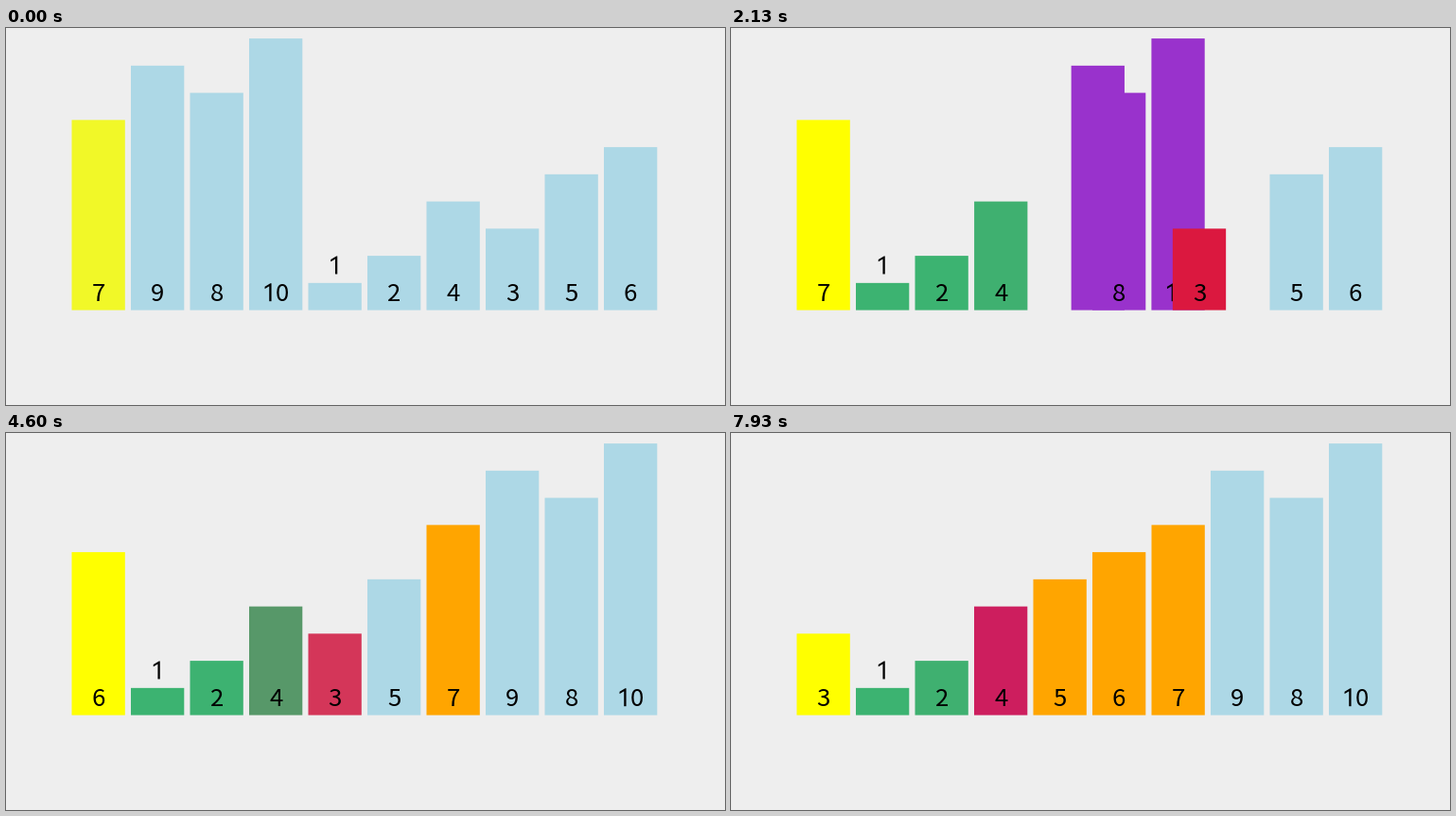
A matplotlib script that plays this animation: 760x399 px, repeating every 8 s.

```python
import numpy as np
import matplotlib.pyplot as plt
from matplotlib.animation import FuncAnimation
from matplotlib.colors import to_rgb
from matplotlib.patches import Polygon, Rectangle

W, H, DPI = 760, 399, 100
LOOP, INTERVAL = 8000, 20
PICTURE = 200 / 3            # the picture is refreshed 15 times a second
STEP, FADE, LEAD = 200, 245, 159   # ms per step, ms per transition, ms already run

LEFT, PITCH, BAR_W = 69.5, 62.5, 56.3
FLOOR, UNIT, BASELINE = 298.6, 28.75, 289.2

BLUE, YELLOW, RED = "lightblue", "yellow", "crimson"
GREEN, PURPLE, ORANGE = "mediumseagreen", "darkorchid", "orange"

VALUES = [7, 9, 8, 10, 1, 2, 4, 3, 5, 6]
order = VALUES[:]
tint = {v: BLUE for v in VALUES}
states = []


def push():
    states.append([(order.index(v), *to_rgb(tint[v])) for v in VALUES])


def swap(a, b):
    order[a], order[b] = order[b], order[a]
    push()


def quicksort(lo, hi):
    pivot = order[lo]
    tint[pivot] = YELLOW
    push()
    store = lo + 1
    for i in range(lo + 1, hi + 1):
        v = order[i]
        tint[v] = RED
        push()
        if v < pivot:
            if i != store:
                swap(i, store)
            tint[v] = GREEN
            store += 1
        else:
            tint[v] = PURPLE
    push()
    swap(lo, store - 1)
    for v in order[lo:hi + 1]:
        tint[v] = BLUE
    tint[pivot] = ORANGE
    push()
    if store - 2 > lo:
        quicksort(lo, store - 2)


def ease(t):
    t = min(max(t, 0), 1)
    return 4 * t**3 if t < 0.5 else 1 - 4 * (1 - t)**3


push()
quicksort(0, len(VALUES) - 1)
states = np.array(states)

# Each step cuts the one before it short and goes on from where it stood.
starts, goals = [states[0]], states[1:]
for goal in goals:
    starts.append(starts[-1] + (goal - starts[-1]) * ease(STEP / FADE))

fig = plt.figure(figsize=(W / DPI, H / DPI), dpi=DPI, facecolor="#eeeeee")
ax = fig.add_axes([0, 0, 1, 1])
ax.set_xlim(0, W)
ax.set_ylim(H, 0)
ax.axis("off")

ONE = np.array([(0.3, 0), (2.6, 0), (2.6, -19), (1.6, -19),
                (-4.4, -15.4), (-4.4, -13.1), (0.3, -15.9)])


class Bar:
    def __init__(self, value, depth):
        height = value * UNIT
        self.base = BASELINE - (UNIT if value == 1 else 0)
        self.rect = Rectangle((0, FLOOR - height), BAR_W, height,
                              lw=0, zorder=depth, snap=False)
        ax.add_patch(self.rect)
        self.parts = []
        digits = str(value)
        for j, digit in enumerate(digits):
            shift = 14.4 * (j - (len(digits) - 1) / 2)
            if digit == "1":
                part = Polygon(ONE, fc="black", lw=0, zorder=depth + 0.5)
                ax.add_patch(part)
            else:
                part = ax.text(0, self.base, digit, ha="center", va="baseline",
                               family="Noto Sans CJK JP", size=25.8 * 72 / DPI,
                               color="black", zorder=depth + 0.5)
            self.parts.append((part, shift))

    def place(self, slot, rgb):
        x = LEFT + PITCH * slot
        self.rect.set_x(x)
        self.rect.set_facecolor(np.clip(rgb, 0, 1))
        for part, shift in self.parts:
            cx = x + BAR_W / 2 + shift
            if isinstance(part, Polygon):
                part.set_xy(ONE + (cx, self.base))
            else:
                part.set_x(cx)


bars = [Bar(v, i + 1) for i, v in enumerate(VALUES)]


def draw(frame):
    ms = int((frame * INTERVAL + 14) / PICTURE) * PICTURE
    k, elapsed = divmod(ms + LEAD, STEP)
    k = int(k)
    now = starts[k] + (goals[k] - starts[k]) * ease(elapsed / FADE)
    for bar, row in zip(bars, now):
        bar.place(row[0], row[1:])
    return []


anim = FuncAnimation(fig, draw, frames=LOOP // INTERVAL, interval=INTERVAL,
                     init_func=lambda: draw(0), repeat=True, repeat_delay=0)
plt.show()
```
